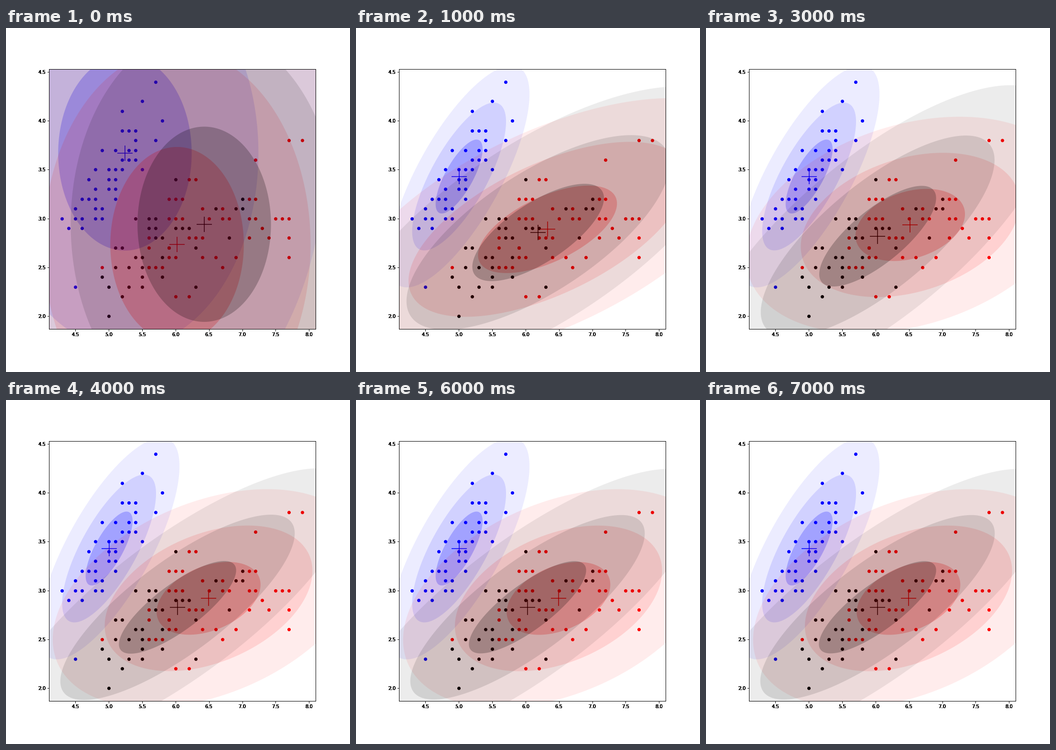
A matplotlib script that plays this animation: 720 px wide and 720 px high, repeating every 8 s.

```python
from itertools import product

import numpy as np
import matplotlib.pyplot as plt
from matplotlib.animation import FuncAnimation
from matplotlib.patches import Polygon

BOX = [0.125, 0.125, 0.775, 0.755]
XLIM, YLIM = (4.1045, 8.0985), (1.8668, 4.5278)
COLORS = ["blue", "red", "black"]
STEPS = 8

# Gaussian per cluster: mean x, mean y, sigma x, sigma y, correlation
BLUE_FIT = (5.005, 3.429, 0.3515, 0.3785, 0.742)


def fit(red, black):
    return np.array([BLUE_FIT, red, black])


START = np.array([(5.242, 3.67, 1, 1, 0), (6.023, 2.732, 1, 1, 0), (6.43, 2.94, 1, 1, 0)])
POSES = [
    START,
    fit((6.329, 2.888, 1.041, 0.448, 0.59), (6.189, 2.856, 0.986, 0.4985, 0.705)),
    fit((6.453, 2.907, 0.957, 0.388, 0.40), (6.082, 2.840, 0.915, 0.5535, 0.74)),
    fit((6.520, 2.933, 0.820, 0.3695, 0.30), (6.032, 2.818, 0.8755, 0.5155, 0.755)),
]
FINAL = fit((6.494, 2.918, 0.776, 0.373, 0.38), (6.03, 2.827, 0.878, 0.4725, 0.80))


def pose(step):
    """Early steps jump between poses, later ones settle on the final fit."""
    if step < len(POSES):
        return POSES[step]
    rest = 0.05 ** (step - len(POSES) + 1)
    return FINAL + (POSES[-1] - FINAL) * rest


def place(params, radius, angle):
    mx, my, sx, sy, rho = params
    c, s = np.cos(angle), np.sin(angle)
    x = mx + radius * sx * c
    y = my + radius * sy * (rho * c + np.sqrt(1 - rho**2) * s)
    return np.column_stack([x, y])


def contour(params, k):
    return place(params, k, np.linspace(0, 2 * np.pi, 240, endpoint=False))


def span(first, last):
    return range(first, last + 1)


def cloud(params, blocks, outliers, size):
    """Measurements in tenths: dense blocks, lone points, random core."""
    pts = set(outliers)
    for xs, ys in blocks:
        pts.update(product(xs, ys))
    while len(pts) < size:
        radius = 1.4 * np.sqrt(rng.random())
        spot = place(params, radius, rng.uniform(0, 2 * np.pi))[0]
        pts.add(tuple(int(v) for v in np.rint(spot * 10)))
    return np.array(sorted(pts)) / 10


rng = np.random.default_rng(4)
blue = cloud(
    FINAL[0],
    [(span(50, 51), span(33, 35)), (span(48, 49), span(30, 31)), (span(53, 54), [37])],
    [(57, 44), (55, 42), (52, 41), (58, 40), (54, 39), (57, 38),
     (55, 35), (44, 29), (43, 30), (45, 23)], 42)
black = cloud(
    FINAL[2],
    [(span(56, 57), span(29, 30)), ([55], span(23, 26)), (span(60, 62), [29])],
    [(60, 34), (70, 32), (68, 28), (54, 30), (52, 27), (51, 25),
     (49, 24), (50, 23), (63, 23), (50, 20)], 36)
red = cloud(
    FINAL[1],
    [(span(59, 61), [30]), (span(62, 64), [28]), (span(67, 68), [30]),
     (span(71, 72), [30]), (span(76, 77), [30]), (span(62, 63), [34])],
    [(77, 38), (79, 38), (72, 36), (72, 32), (73, 29), (74, 28),
     (77, 28), (77, 26), (67, 25), (49, 25), (60, 22), (62, 22)], 46)


def add_axes(label):
    ax = fig.add_axes(BOX, label=label)
    ax.set(xlim=XLIM, ylim=YLIM,
           xticks=np.arange(4.5, 8.1, 0.5), yticks=np.arange(2, 4.6, 0.5))
    return ax


fig = plt.figure(figsize=(10, 10), dpi=72, facecolor="white")
ax = add_axes("plot")

for pts, color in ((blue, "blue"), (black, "black"), (red, "red")):
    ax.scatter(pts[:, 0], pts[:, 1], s=36, c=color, zorder=1)

crosses = [ax.scatter([0], [0], s=1000, c=color, marker="+", zorder=1.1)
           for color in COLORS]

# Wide contours first, tighter ones more opaque
rings = []
for i, color in enumerate(COLORS):
    for k in (3, 2, 1):
        ring = Polygon(contour(START[i], k), closed=True, facecolor=color,
                       edgecolor="none", lw=0, alpha=0.225 / k, zorder=1.5)
        ax.add_artist(ring)
        rings.append((i, k, ring))

# Stacked transparent axes harden the frame and tick labels
for n in range(10):
    add_axes(f"layer{n}").patch.set_visible(False)


def update(step):
    params = pose(step)
    for cross, p in zip(crosses, params):
        cross.set_offsets([p[:2]])
    for i, k, ring in rings:
        ring.set_xy(contour(params[i], k))
    return crosses + [ring for _, _, ring in rings]


anim = FuncAnimation(fig, update, frames=STEPS, interval=1000,
                     repeat=True, repeat_delay=0, blit=False)
plt.show()
```
